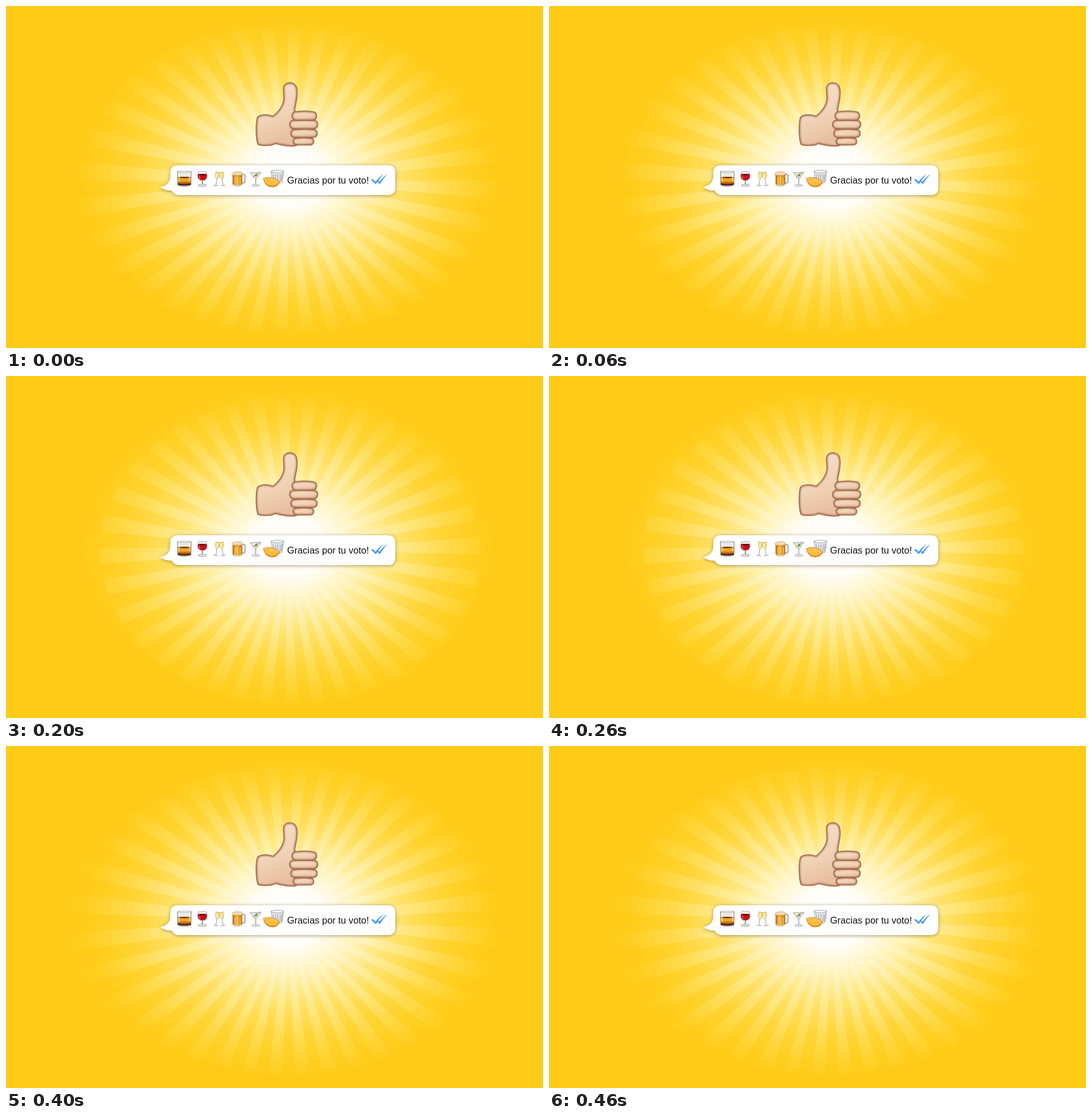
Write an HTML page that moves like this. It is 938 px wide and 597 px high and loops after 0.5 s.

```html
<!DOCTYPE html>
<html lang="es">
<head>
<meta charset="utf-8">
<title>Gracias por tu voto</title>
<style>
html,body{margin:0;width:100%;height:100%;overflow:hidden;background:#ffcb17}
svg{display:block;width:100vw;height:100vh}
text{font-family:"Liberation Sans",Arial,sans-serif;font-size:16.4px}
</style>
</head>
<body>
<svg viewBox="0 0 938 597">
<defs>
  <radialGradient id="glow">
    <stop offset="0" stop-color="#fff"/>
    <stop offset=".18" stop-color="#fff" stop-opacity=".97"/>
    <stop offset=".36" stop-color="#fffde2" stop-opacity=".78"/>
    <stop offset=".55" stop-color="#fffac4" stop-opacity=".48"/>
    <stop offset=".76" stop-color="#fff6a4" stop-opacity=".2"/>
    <stop offset="1" stop-color="#ffef80" stop-opacity="0"/>
  </radialGradient>
  <radialGradient id="beam" gradientUnits="userSpaceOnUse" cx="0" cy="0" r="1" gradientTransform="scale(365 272)">
    <stop offset="0" stop-color="#fff" stop-opacity="0"/>
    <stop offset=".2" stop-color="#fff" stop-opacity=".1"/>
    <stop offset=".4" stop-color="#fffdeb" stop-opacity=".27"/>
    <stop offset=".6" stop-color="#fffbd6" stop-opacity=".27"/>
    <stop offset=".8" stop-color="#fff9c0" stop-opacity=".17"/>
    <stop offset="1" stop-color="#fff6a4" stop-opacity=".03"/>
  </radialGradient>
  <linearGradient id="skin" x1="0" y1="0" x2=".3" y2="1">
    <stop offset="0" stop-color="#f6e0c8"/>
    <stop offset=".6" stop-color="#f0d4b8"/>
    <stop offset="1" stop-color="#e8bf9f"/>
  </linearGradient>
  <linearGradient id="whisky" x1="0" y1="0" x2="0" y2="1">
    <stop offset="0" stop-color="#e89a1c"/>
    <stop offset=".5" stop-color="#f2a928"/>
    <stop offset="1" stop-color="#8a3c0c"/>
  </linearGradient>
  <linearGradient id="beer">
    <stop offset="0" stop-color="#b8650c"/>
    <stop offset=".4" stop-color="#f6b533"/>
    <stop offset="1" stop-color="#c8740f"/>
  </linearGradient>
  <filter id="soft" x="-30%" y="-30%" width="160%" height="160%"><feGaussianBlur stdDeviation="1.7"/></filter>
  <filter id="shade" x="-10%" y="-40%" width="120%" height="190%"><feGaussianBlur stdDeviation="3"/></filter>
  <path id="bubble" d="M301 278H667Q680 278 680 291V317Q680 330 667 330H302Q294 330 289 322Q279 323 269 316Q286 313 287 298V291Q287 278 301 278Z"/>
</defs>

<rect width="938" height="597" fill="#ffcb17"/>
<g transform="translate(492 305)">
  <ellipse cy="-6" rx="360" ry="280" fill="url(#glow)"/>
  <path id="rays" fill="url(#beam)"/>
</g>

<g id="hand"></g>

<use href="#bubble" y="1" fill="#6a5a20" opacity=".6" filter="url(#shade)"/>
<use href="#bubble" fill="#fff"/>

<g id="whiskyGlass">
  <path d="M299.500 289H323.500L323 312Q322 314.500 311.500 314.500T300 312Z" fill="#eee9e2" stroke="#77706a" stroke-width=".9"/>
  <path d="M300 299Q311.500 297.500 323 299V310Q311.500 313 300 310Z" fill="url(#whisky)"/>
  <ellipse cx="311.500" cy="299.300" rx="11" ry="1.100" fill="#5a230a"/>
  <path d="M300 309.500Q311.500 313 323 309.500V312Q311.500 315 300 312Z" fill="#43200f"/>
  <path d="M302.500 291V307M320.500 291V306" stroke="#fff" stroke-opacity=".75"/>
  <ellipse cx="311.500" cy="289.500" rx="11.800" ry="1.300" fill="#fafafa" stroke="#999" stroke-width=".7"/>
</g>

<g id="wine">
  <path d="M336.500 289H349.500Q354 300 347 304Q343 306 339 304Q332 300 336.500 289Z" fill="#f1efee" stroke="#99918e" stroke-width=".8"/>
  <path d="M335.300 294Q343 292 350.700 294Q352 301 347 303.500Q343 305 339 303.500Q334 301 335.300 294Z" fill="#c01216"/>
  <ellipse cx="343" cy="294.200" rx="7.500" ry="1.300" fill="#5e0710"/>
  <path d="M338 296Q337 300 339.500 302" fill="none" stroke="#f46a62" stroke-width="1.300"/>
  <path d="M343 305V312" stroke="#8d8886" stroke-width="1.800"/>
  <ellipse cx="343" cy="313" rx="7.500" ry="2" fill="#e7e4e2" stroke="#8d8886" stroke-width=".8"/>
</g>

<g id="toast" stroke-linecap="round"></g>

<g id="beerMug">
  <path d="M412 294H415Q417.500 294 417.500 297V306Q417.500 309 414 309H412" fill="none" stroke="#aaa39a" stroke-width="2"/>
  <path d="M396 293H412.500V311Q412 314.500 404 314.500T396 311Z" fill="url(#beer)" stroke="#a9937a" stroke-width=".9"/>
  <path d="M400 299V311M404.500 299V312M409 299V311" stroke="#ffe08a" stroke-width="1.300" opacity=".8"/>
  <path d="M395 295Q393.500 291 398 290.500Q402 288 406 289.500Q412 288.500 413 292Q413 295 411 295Q404 296 400 295Q398 296 395 295Z" fill="#f2dcae" stroke="#b8955f" stroke-width=".7"/>
  <path d="M396.500 312Q404 315.500 412 312" fill="none" stroke="#ddd6cb" stroke-width="1.800"/>
</g>

<g id="martini">
  <path d="M426.500 291H445.500L437 301.500H435.500Z" fill="#eef0ee" stroke="#858a86" stroke-width=".9"/>
  <path d="M429 294H443L436.500 301Z" fill="#d9ddca"/>
  <path d="M431 299L444 289" stroke="#8e754b" stroke-width=".8"/>
  <ellipse cx="437" cy="295" rx="2.600" ry="1.700" fill="#7d8c2c" transform="rotate(-35 437 295)"/>
  <path d="M436.300 301V312.500" stroke="#9a9e9b" stroke-width="1.500"/>
  <ellipse cx="436.300" cy="313.300" rx="7" ry="1.700" fill="#e9ebe9" stroke="#969a97" stroke-width=".8"/>
</g>

<g id="shot">
  <path d="M463 288H485L482.500 307Q481 309.500 474 309.500T466 307Z" fill="#e6e8ea" stroke="#8b8f94" stroke-width=".8"/>
  <path d="M467 294L468.500 306M471 294V307M475 294V307M479 294L478 307M482.500 293L480.500 306" stroke="#8b9097" stroke-width="1.100"/>
  <path d="M469 295V306M477 295V307" stroke="#fff" stroke-width="1.200"/>
  <ellipse cx="474" cy="289" rx="10.800" ry="2.300" fill="#f8f9fa" stroke="#8b8f94" stroke-width=".8"/>
  <path d="M449.500 301Q464 295.500 478 306.500Q475 316 465 316Q452 315.500 449.500 301Z" fill="#f18b06" stroke="#cf6f04" stroke-width=".6"/>
  <path d="M451 302Q464 298 476 306.500Q472 313 464 313Q454 311.500 451 302Z" fill="#ffb62a" stroke="#ffe7a8" stroke-width=".9"/>
  <path d="M464 302.500L455 308M464 302.500L461 312M464 302.500L469 312M464 302.500L474 308" stroke="#ffe09a" stroke-width=".8"/>
</g>

<text x="491" y="310" fill="#111">Gracias por tu voto!</text>
<g fill="#3d94f8">
  <path d="M638 303.500L640.500 302L645.500 307Q651 299 659.500 293.500Q652 301 646 311Z"/>
  <path d="M649 307L650.500 305L652.500 307Q658 299 666 293.500Q659 301 653 311Z"/>
</g>
</svg>

<script>
const el = id => document.getElementById(id);
const skinPart = (d, i) => `
  <clipPath id="clip${i}"><path d="${d}"/></clipPath>
  <path d="${d}" fill="url(#skin)"/>
  <g clip-path="url(#clip${i})"><path d="${d}" fill="none" stroke="#a9694b" stroke-width="4" filter="url(#soft)"/></g>
  <path d="${d}" fill="none" stroke="#7f4630" stroke-width=".9" stroke-opacity=".85"/>`;

// A finger is a rounded bar, slightly fuller in the middle.
const finger = (x, y, w, h) => {
  const r = h / 2;
  return `M${x + r} ${y + 1}Q${x + w * .55} ${y - 1} ${x + w - r} ${y + 1}` +
    `Q${x + w} ${y + 1} ${x + w} ${y + r}Q${x + w} ${y + h} ${x + w - r} ${y + h}` +
    `L${x + r} ${y + h}Q${x} ${y + h} ${x} ${y + r}Q${x} ${y + 1} ${x + r} ${y + 1}Z`;
};
const palm = "M466 192C476 184 484 174 485 162C485.500 153 483 146 485 140C488 131.500 503 131.500 507 140" +
  "C511 150 508 164 505 178C503 186 512 190 515 200L514 238Q510 245 500 245C488 245 477 242 470 240.500" +
  "C467 244.500 445 245 440 242C436 234 435.500 203 439 194C445 188 459 189 466 192Z";
const fingers = [[501, 229, 37, 14], [497, 214, 47, 16], [495, 198, 50, 17], [499, 183, 44, 17]];
el("hand").innerHTML = [palm, ...fingers.map(f => finger(...f))].map(skinPart).join("");

const flute = (x, tilt) => `<g transform="rotate(${tilt} ${x} 301)">
  <path d="M${x - 3.5} 290H${x + 3.5}Q${x + 4.5} 300 ${x} 302Q${x - 4.5} 300 ${x - 3.5} 290Z" fill="#f2df80" stroke="#b9aa72" stroke-width=".7"/>
  <path d="M${x - 1} 293V299" stroke="#fffbe0" stroke-width="1.300"/>
  <path d="M${x} 302V312.500M${x - 3.5} 313.500H${x + 3.5}" stroke="#aaa797" stroke-width="1.200"/></g>`;
el("toast").innerHTML = flute(368.5, 9) + flute(377.5, -9);

const COUNT = 36, STEP = 100, HEIGHT = 268;
const GAP = 360 / COUNT;
// Left and right reach of the burst at each step.
const REACH = [[372, 376], [365, 381], [328, 338], [328, 334], [386, 372]];

// The burst turns back by one whole gap per loop.
function burst([left, right], step) {
  let d = "";
  for (let i = 0; i < COUNT; i++) {
    const deg = i * GAP + 2.5 - step * GAP / REACH.length;
    const edge = off => {
      const a = (deg + off) * Math.PI / 180, c = Math.cos(a), s = Math.sin(a);
      const len = 1 / Math.hypot(c / (c < 0 ? left : right), s / HEIGHT);
      return (len * c).toFixed(1) + " " + (len * s).toFixed(1);
    };
    d += `M0 0L${edge(-GAP / 4)}L${edge(GAP / 4)}Z`;
  }
  return d;
}
const shapes = REACH.map(burst);

function draw(now) {
  el("rays").setAttribute("d", shapes[Math.floor(now / STEP) % shapes.length]);
}
const start = performance.now();
function tick() {
  draw(performance.now() - start);
  requestAnimationFrame(tick);
}
tick();
</script>
</body>
</html>
```
